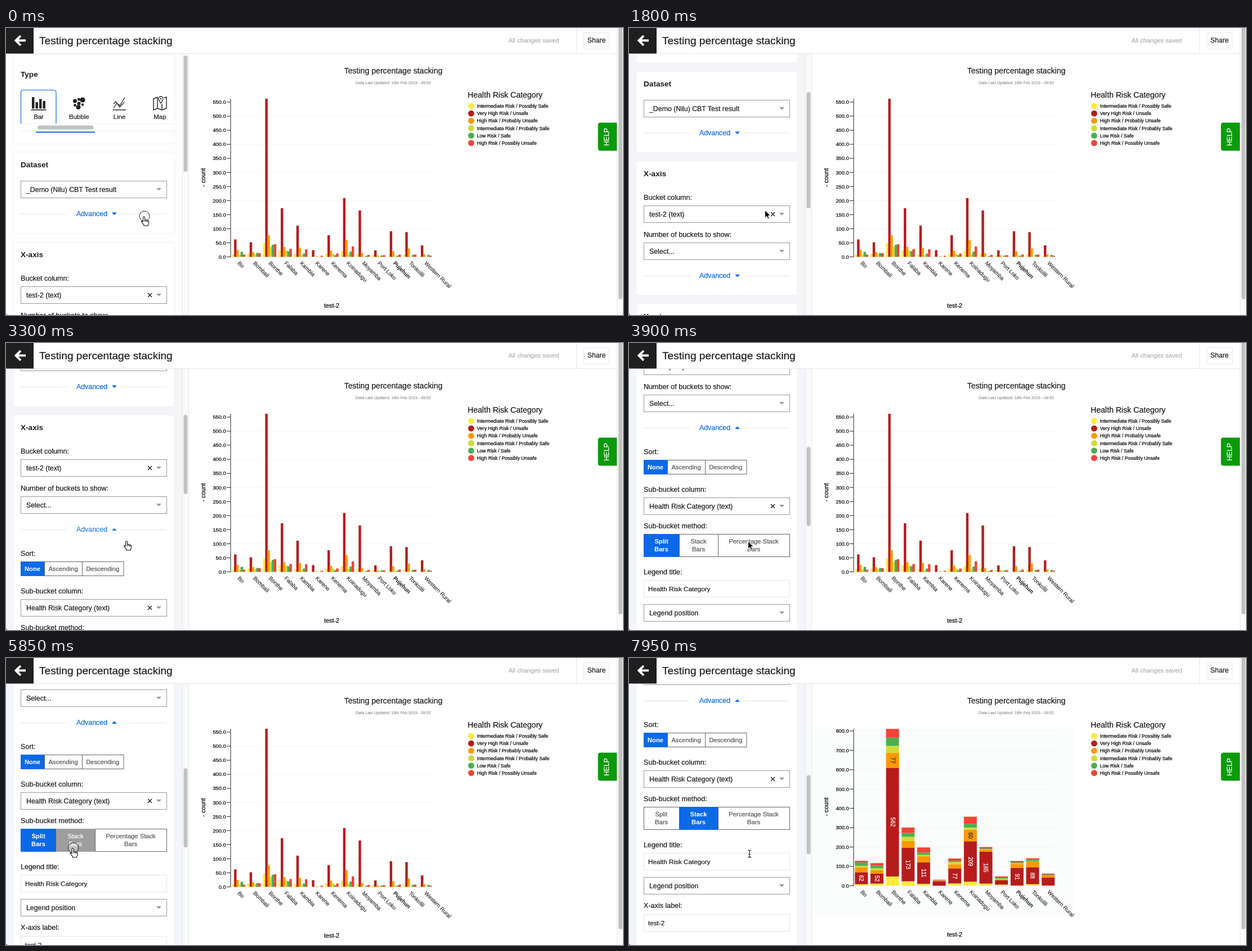
These frames come from a looping animation (1096 by 511 pixels, 8 s). An HTML page:

```html
<!DOCTYPE html>
<html lang="en">
<head>
<meta charset="utf-8">
<title>Testing percentage stacking</title>
<style>
  html, body { margin: 0; width: 100%; height: 100%; overflow: hidden; background: #fff; }
  svg { display: block; width: 1096px; height: 511px; font-family: "Liberation Sans", Arial, sans-serif; }
  text { white-space: pre; stroke-width: 0.22px; }
</style>
</head>
<body>
<svg id="stage" viewBox="0 0 1096 511"></svg>
<script>
const BLUE = '#0b69e8', INK = '#1c1c1c';
const LOOP = 8000, STEP = 150;

// ---------- drawing helpers ----------
const tag = (name, attrs, inner = '') =>
  `<${name} ${Object.entries(attrs).map(([k, v]) => `${k}="${v}"`).join(' ')}>${inner}</${name}>`;
const rect = (x, y, width, height, fill, more = {}) => tag('rect', { x, y, width, height, fill, ...more });
const path = (d, more = {}) => tag('path', { d, fill: 'none', ...more });
const group = (inner, attrs = {}) => tag('g', attrs, inner);
// y is the middle of the capitals; a hairline stroke gives the text its weight
const text = (x, y, s, size, { fill = INK, ...more } = {}) =>
  tag('text', { x, y: (y + size * 0.36).toFixed(2), 'font-size': size, fill, stroke: fill, ...more }, s);
const mid = { 'text-anchor': 'middle' };
const bold = { 'font-weight': 700 };
const turn = (deg, x, y) => ({ transform: `rotate(${deg} ${x} ${y})` });

// ---------- side panel parts ----------
const card = (y, h) => rect(13, y, 286, h, '#fff', { rx: 3, stroke: '#f0f0f3' });
const heading = (y, s) => text(26, y, s, 13.6, { ...bold, stroke: 'none' });
const label = (y, s) => text(26, y, s, 12.6);
const caret = (x, y, up, fill) => path(`M${x - 4.5} ${y + (up ? 2 : -2)}h9l-4.5 ${up ? -4.5 : 4.5}z`, { fill });
const select = (y, s, clear) =>
  rect(26.5, y + 0.5, 259, 30, '#fff', { stroke: '#999' }) +
  text(36, y + 15.5, s, 12.35) + caret(271.5, y + 15, false, '#999') +
  (clear ? path(`M252 ${y + 12}l7 7m0 -7l-7 7`, { stroke: '#222', 'stroke-width': 1.5 }) : '');
const input = (y, s) =>
  rect(26.5, y + 0.5, 259, 30, '#fff', { stroke: '#e6e6e6' }) + text(34, y + 15.5, s, 11.7);
const advanced = (y, up, cls) =>
  path(`M26 ${y + 0.5}H108M205 ${y + 0.5}H285`, { stroke: '#e4e4e6' }) +
  group(text(152.5, y, 'Advanced', 12.4, { ...mid, fill: 'currentColor' }) + caret(192.5, y, up, 'currentColor'),
    { class: cls, color: BLUE });
const segments = (edges, y, h, names, cls) => names.map((name, i) => {
  const lines = name.split('|');
  const cx = (edges[i] + edges[i + 1]) / 2;
  return group(
    rect(edges[i] + 0.5, y + 0.5, edges[i + 1] - edges[i], h, '#fff') +
    lines.map((s, k) => text(cx, y + h / 2 + (k - (lines.length - 1) / 2) * 14.6, s, 11.2,
      { ...mid, fill: '#555' })).join(''), { class: cls });
}).join('');

const typeIcons =
  [[46, 123], [52.5, 132], [59, 126.5], [65.5, 130]].map(([x, y]) => rect(x, y, 4.4, 143.5 - y, '#222')).join('') +
  rect(44.5, 145, 27, 1.6, '#222') +
  [[122.5, 130, 3.6], [129.5, 127, 2.5], [136, 128, 4.6], [122.5, 137.5, 2.4], [129.5, 134.5, 3],
    [128.5, 141, 4], [136, 136.5, 2.2]].map(([cx, cy, r]) => tag('circle', { cx, cy, r, fill: '#222' })).join('') +
  path('M191 143l6-9 5 4 9-14M191 135l4-4 7 10 8-9', { stroke: '#222', 'stroke-width': 1.3 }) +
  rect(190, 145, 23, 1.4, '#222') +
  path('M269 123l-7 3v20l7-3 8 3 8-3v-20l-4 1.500M269 123v20M277 135v11', { stroke: '#222', 'stroke-width': 1.4 }) +
  path('M275 134q-4-6-4-8a4 4 0 0 1 8 0q0 2-4 8z', { stroke: '#222', 'stroke-width': 1.3, fill: '#fff' }) +
  tag('circle', { cx: 275, cy: 126, r: 1.3, fill: '#222' });

const typeCard = card(47, 159) + heading(82, 'Type') +
  path('M26.5 170V115q0-4.500 4.500-4.500h53.500q4.500 0 4.500 4.500V170', { stroke: BLUE, 'stroke-width': 1.2 }) +
  typeIcons +
  ['Bar', 'Bubble', 'Line', 'Map'].map((s, i) => text(58 + i * 71.8, 157.5, s, 11.4, mid)).join('') +
  path('M26 170.500H299M26 183.500H299', { stroke: '#ececec' }) +
  rect(56, 173.5, 99.5, 7, '#c1c1c1', { rx: 3.5 }) +
  rect(53, 184.5, 105, 2, BLUE);

const panelTop = typeCard + card(221, 145) + heading(243.5, 'Dataset') +
  select(272, '_Demo (Nilu) CBT Test result') + advanced(330.5, false, 'adv1');
const axisTop = heading(403, 'X-axis') + label(445.5, 'Bucket column:') + select(460, 'test-2 (text)', true) +
  label(511, 'Number of buckets to show:') + select(526, 'Select...');

const sortEdges = [26, 68, 135, 208.5], methodEdges = [26, 89, 158, 285];
const closedPart = card(381, 239) + axisTop + advanced(585, false, 'adv2') + card(635, 240) + heading(657, 'Y-axis');
const openPart = card(381, 740) + axisTop + advanced(585, true, 'adv2') +
  label(627, 'Sort:') + segments(sortEdges, 642, 25, ['None', 'Ascending', 'Descending'], 'sort') +
  label(694, 'Sub-bucket column:') + select(709, 'Health Risk Category (text)', true) +
  label(759.5, 'Sub-bucket method:') +
  segments(methodEdges, 774, 40, ['Split|Bars', 'Stack|Bars', 'Percentage Stack|Bars'], 'method') +
  label(841, 'Legend title:') + input(856, 'Health Risk Category') +
  select(899, 'Legend position') + label(949.5, 'X-axis label:') + input(965, 'test-2');

// ---------- chart ----------
const levels = [
  ['Intermediate Risk / Possibly Safe', '#ffeb3b'], ['Very High Risk / Unsafe', '#b71c1c'],
  ['High Risk / Probably Unsafe', '#ff9800'], ['Intermediate Risk / Probably Safe', '#cddc39'],
  ['Low Risk / Safe', '#4caf50'], ['High Risk / Possibly Unsafe', '#f44336']];
const districts = {
  'Bo': [8, 62, 25, 8, 18, 8], 'Bombali': [11, 52, 17, 10, 14, 13], 'Bonthe': [48, 562, 77, 36, 43, 45],
  'Falaba': [23, 173, 35, 22, 20, 28], 'Kambia': [10, 111, 32, 6, 12, 27], 'Karene': [0, 24, 0, 3, 0, 4],
  'Kenema': [12, 77, 22, 12, 6, 12], 'Koinadugu': [21, 209, 60, 11, 19, 37], 'Moyamba': [11, 165, 13, 1, 3, 7],
  'Port Loko': [6, 23, 5, 3, 5, 6], 'Pujehun': [1, 91, 20, 4, 4, 8], 'Tonkolili': [8, 88, 30, 1, 7, 8],
  'Western Rural': [1, 41, 9, 1, 7, 4]};
const PITCH = 27.65, LEFT = 401.3, WIDTH = 23;

function chart(base, scale, max, step, shift, stacked) {
  let out = '';
  for (let v = 0; v <= max; v += step) {
    const y = base - v * scale;
    if (v && v % 100 === 0) out += path(`M400 ${y}H758`, { stroke: '#f4f4f4' });
    out += path(`M392 ${y}H399`, { stroke: '#222' }) +
      text(390.5, y, v.toFixed(1), 9.2, { 'text-anchor': 'end', fill: '#000' });
  }
  out += path(`M399 126V${base + 0.5}`, { stroke: '#222' });
  Object.entries(districts).forEach(([name, values], i) => {
    const x = LEFT + i * PITCH;
    let sum = 0;
    values.forEach((v, k) => {
      const h = v * scale;
      if (!stacked) {
        out += rect((x + k * WIDTH / 6).toFixed(2), base - h, 4.4, h, levels[k][1]);
        return;
      }
      const bottom = base - sum * scale, cx = x + WIDTH / 2, cy = bottom - h / 2;
      out += rect(x.toFixed(2), bottom - h, WIDTH, h, levels[k][1]);
      if (v >= 50) out += text(cx, cy, v, 10, { ...mid, fill: k === 1 ? '#fff' : '#333', ...turn(90, cx, cy) });
      sum += v;
    });
    const lx = x + 12, ly = 417 + shift;
    out += text(lx, ly, name, 9.8, { ...turn(45, lx, ly), fill: '#333', ...(name === 'Pujehun' ? bold : {}) });
  });
  const cy = 266 + shift / 2;
  return out + text(350, cy, '- count', 10.9, { ...mid, fill: '#000', ...turn(-90, 350, cy) }) +
    text(578.5, 494 + shift, 'test-2', 10.8, { ...mid, fill: '#000' });
}

const legend = text(820, 119, 'Health Risk Category', 14.1) +
  levels.map(([name, fill], i) => {
    const cy = 139 + i * 13.15;
    return tag('circle', { cx: 826.3, cy, r: 5.4, fill }) + text(836.5, cy, name, 8.65, { fill: '#000' });
  }).join('');

const chartArea = rect(325, 46, 760, 465, '#fff') + rect(326, 124, 464, 336, '#fbfcfc', { id: 'tint' }) +
  text(688, 76, 'Testing percentage stacking', 14.1, mid) +
  text(688, 97, 'Data Last Updated: 18th Feb 2019 - 09:52', 7.15, { ...mid, fill: '#999' }) + legend +
  group(chart(407.5, 0.501, 550, 50, 0, false), { id: 'split' }) +
  group(chart(405.5, 0.3444, 800, 100, -2, true), { id: 'stack' });

// ---------- page frame ----------
const header = rect(0, 0, 1085, 45, '#fff') + path('M0 45.500H1085M1013.500 0V45', { stroke: '#e6e6e6' }) +
  rect(0, 0, 49, 45.5, '#1f1f1f') +
  path('M35 22.300H19M26 13.800l-8.500 8.500 8.500 8.500', { stroke: '#fff', 'stroke-width': 4 }) +
  text(59, 21.8, 'Testing percentage stacking', 19.1) +
  group(text(892.5, 22, 'All changes saved', 11.1, { fill: '#b0b0b0' }), { id: 'saved' }) +
  group(text(982, 22, 'Saving...', 11.1, { fill: '#b0b0b0', 'text-anchor': 'end' }), { id: 'saving' }) +
  rect(1026.5, 8.5, 45, 29, '#fff', { rx: 2, stroke: '#e6e6e6' }) + text(1049, 22, 'Share', 12.1, mid);
const help = path('M1085 168.500H1056q-4.500 0-4.500 4.500V214q0 4.500 4.500 4.500H1085z', { fill: '#0a9a0a' }) +
  text(1067, 194, 'HELP', 12.3, { ...mid, fill: '#fff', 'stroke-width': 0.4, ...turn(-90, 1067, 194) });
const frame = rect(1085, 0, 11, 511, '#fafafa') + path('M1085.500 0V511', { stroke: '#e8e8e8' }) +
  rect(1088, -5, 7, 488, '#c1c1c1', { rx: 3.5 }) + path('M0 507q0 4 4 4H0z', { fill: '#446' });
const sideBar = rect(313, 46, 12, 465, '#fafafa') + path('M313.500 46V511M324.500 46V511', { stroke: '#e6e6e6' }) +
  rect(315.5, 49, 7, 207, '#c1c1c1', { id: 'thumb', rx: 3.5 });

const outline = { 'stroke-linejoin': 'round' };
const cursors =
  tag('circle', { id: 'ring', cx: 1, cy: -1, r: 9, fill: '#fff', 'fill-opacity': 0.35, stroke: '#222' }) +
  path('M0 0V13.500L3.200 10.600 5.300 15.500 7.600 14.500 5.500 9.700H9.800z',
    { id: 'arrow', fill: '#000', stroke: '#fff', 'stroke-width': 1, ...outline }) +
  path('M-1.500 9V1.200Q-1.300-.3 0-.3T1.600 1.200V5.500Q4 4.600 4.200 6.200 6.300 5.600 6.400 7 8.600 6.600 8.600 8.500V11Q8.400 13 7.200 14.200V16H0V14.500Q-2.500 12-4.600 8.800-4.300 6.800-1.500 9zM1.600 5.500V9M4.200 6.200V9M6.400 7V9.500',
    { id: 'hand', fill: '#fff', stroke: '#111', 'stroke-width': 1.1, ...outline }) +
  path('M-3-6.500Q0-6.500 0-4.500 0-6.500 3-6.500M0-4.500V4.500M-3 6.500Q0 6.500 0 4.500 0 6.500 3 6.500M-1.500 1.500H1.500',
    { id: 'beam', stroke: '#111', 'stroke-width': 1.1 });

const stage = document.getElementById('stage');
stage.innerHTML =
  '<clipPath id="clip"><rect x="0" y="46" width="313" height="465"/></clipPath>' +
  group(rect(0, 46, 313, 465, '#fff', { id: 'back' }) +
    group(panelTop + group(closedPart, { id: 'closed' }) + group(openPart, { id: 'open' }), { id: 'panel' }),
    { 'clip-path': 'url(#clip)' }) +
  sideBar + chartArea + header + help + frame + group(cursors, { id: 'cursor' });

// ---------- motion ----------
const scrollKeys = [[0, 0], [750, 0], [1500, 140], [1650, 140], [1800, 144], [2700, 253], [3450, 253],
  [4050, 467], [4350, 467], [4500, 470], [7050, 470], [7200, 473], [7650, 509]];
// time, x, y of the pointer tip
const pointKeys = [[0, 245, 336], [1650, 245, 336], [1800, 241.5, 324.5], [2250, 241.5, 324.5], [2700, 214, 353],
  [3450, 214, 353], [3600, 211.5, 353], [4500, 211.5, 353], [4950, 70, 339], [5100, 70, 339], [5550, 118.5, 339],
  [6450, 118.5, 339], [6900, 213, 379], [7800, 213, 379], [7950, 214, 348.5]];
const shapeKeys = [[0, 'hand'], [1050, 'arrow'], [2550, 'hand'], [3600, 'arrow'], [4650, 'hand'],
  [6600, 'arrow'], [7950, 'beam']];
const clicks = [[0, 150], [2850, 3150], [5850, 6150]];

const within = (t, a, b) => t >= a && t < b;
const smooth = p => p * p * (3 - 2 * p);
function at(keys, t, n = 1) {
  const i = keys.findIndex(k => k[0] > t);
  if (i < 0) return keys[keys.length - 1][n];
  const a = keys[i - 1], b = keys[i];
  return a[n] + (b[n] - a[n]) * smooth((t - a[0]) / (b[0] - a[0]));
}

const el = id => document.getElementById(id);
const show = (id, on) => { el(id).style.display = on ? '' : 'none'; };
const sortParts = [...stage.querySelectorAll('.sort')], methodParts = [...stage.querySelectorAll('.method')];
const tintLink = (cls, on) => stage.querySelectorAll('.' + cls).forEach(g => g.setAttribute('color', on ? '#2f80ee' : BLUE));

function paint(parts, chosen, hover) {
  parts.forEach((g, i) => {
    const on = i === chosen, over = i === hover;
    const ink = on || over ? '#fff' : '#555';
    g.firstChild.setAttribute('fill', on ? BLUE : over ? '#9e9e9e' : '#fff');
    g.firstChild.setAttribute('stroke', on ? BLUE : over ? '#9e9e9e' : '#666');
    g.querySelectorAll('text').forEach(s => {
      s.setAttribute('fill', ink);
      s.setAttribute('stroke', on ? 'none' : ink);
      s.setAttribute('font-weight', on ? 700 : 400);
    });
  });
}

function draw(t) {
  const scroll = Math.round(at(scrollKeys, t));
  const x = at(pointKeys, t, 1), y = at(pointKeys, t, 2);
  const shape = shapeKeys.filter(k => k[0] <= t).pop()[1];
  const open = t >= 3000, stacked = t >= 6000;

  el('panel').setAttribute('transform', `translate(0 ${-scroll})`);
  el('back').setAttribute('fill', t < 900 ? '#fdfdfd' : t < 3600 ? '#f5f5f9' : '#f3f5fd');
  show('open', open);
  show('closed', !open);
  el('thumb').setAttribute('y', open ? 48.6 + 0.314 * scroll : 49 + 0.451 * scroll);
  el('thumb').setAttribute('height', open ? 141 : 207);

  tintLink('adv1', within(t, 150, 900));
  tintLink('adv2', within(t, 2700, 3600));
  const inMethod = open && shape === 'hand' && within(y + scroll, 774, 815);
  const hover = inMethod ? methodParts.findIndex((_, i) => within(x, methodEdges[i], methodEdges[i + 1])) : -1;
  paint(sortParts, 0, -1);
  paint(methodParts, stacked ? 1 : 0, hover);

  show('split', !stacked);
  show('stack', stacked);
  show('tint', t >= 6600);
  show('saving', within(t, 6000, 6150));
  show('saved', !within(t, 6000, 6150));

  el('cursor').setAttribute('transform', `translate(${x} ${y})`);
  ['arrow', 'hand', 'beam'].forEach(id => show(id, id === shape));
  show('ring', clicks.some(([a, b]) => within(t, a, b)));
}

const start = performance.now();
function tick() {
  const t = (performance.now() - start) % LOOP;
  draw(Math.floor(t / STEP) * STEP);
  requestAnimationFrame(tick);
}
tick();
</script>
</body>
</html>
```
